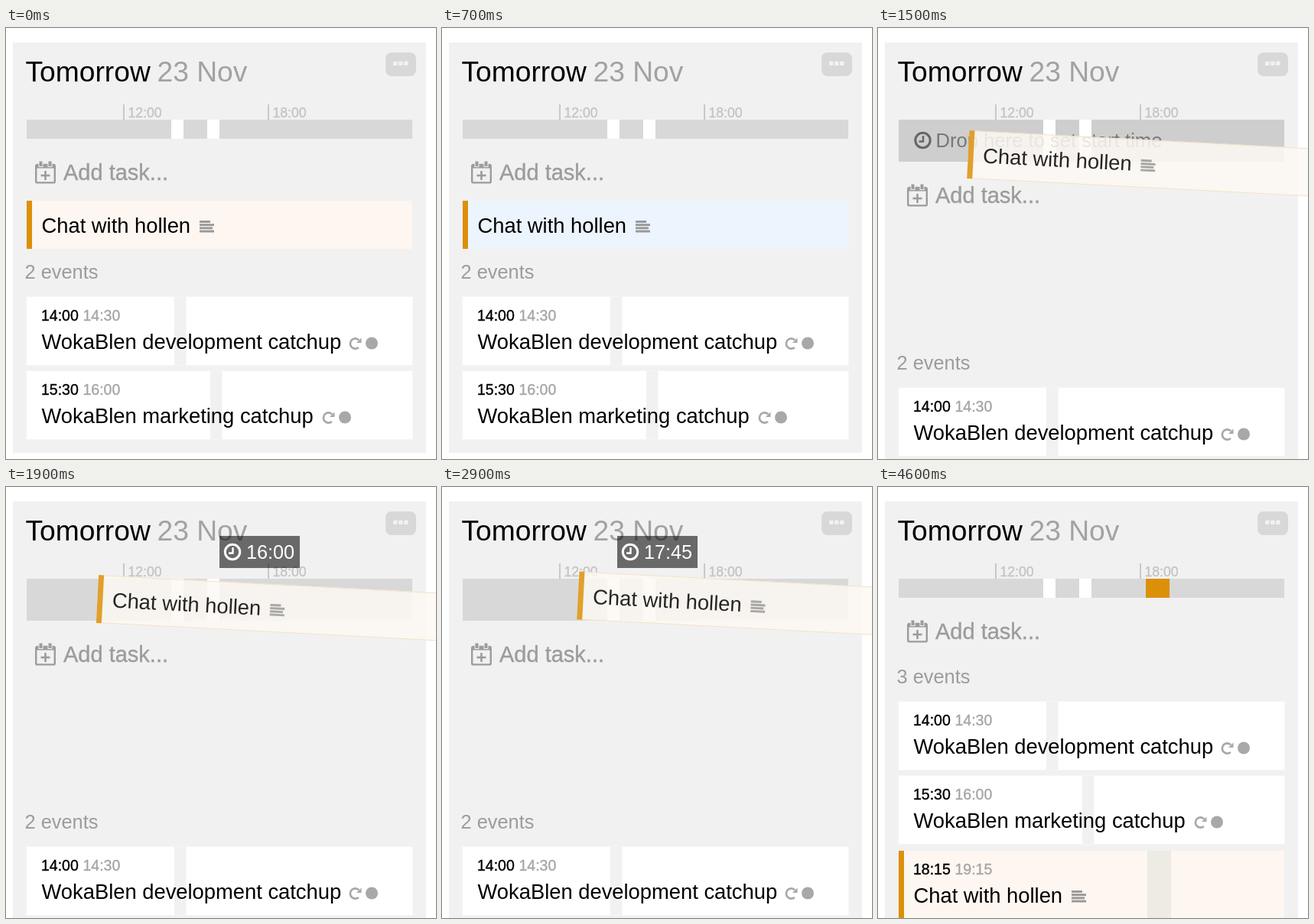
Recreate the animation shown at these times as an HTML page with a canvas. Size 562 by 564 pixels, loop 5800 ms.

```html
<!DOCTYPE html>
<html lang="en">
<head>
<meta charset="utf-8">
<title>Day planner</title>
<style>
html, body { margin: 0; width: 100%; height: 100%; overflow: hidden; background: #fff; }
canvas { display: block; }
</style>
</head>
<body>
<canvas id="stage" width="562" height="564"></canvas>
<script>
const ctx = document.getElementById('stage').getContext('2d');
const LOOP = 5800, TICK = 100;
const PICK = 1200, HOVER = 1600, DROP = 3700;
const BAR_X = 27, BAR_W = 504, HOUR = 31.5, START = 8;
const TILT = 3 * Math.PI / 180;
const PANEL = '#f1f1f1', ORANGE = '#dc9008', GRAY = '#9c9c9c';
const BEIGE = [254, 246, 241], BLUE = [236, 244, 253];
const TASK = 'Chat with hollen', TITLE_SIZE = 27.35;

// time, then the top-left corner of the dragged card
const PATH = [
  [1100, 27, 226], [1500, 119.5, 134], [1700, 121, 116],
  [2300, 121.5, 112.5], [2900, 179.5, 110.5], [3500, 194.5, 109.5]
];

const clamp = v => Math.min(1, Math.max(0, v));
const lerp = (a, b, p) => a + (b - a) * p;
const smooth = p => p * p * (3 - 2 * p);
const hourX = h => BAR_X + (h - START) * HOUR;

function rect(x, y, w, h, color) {
  ctx.fillStyle = color;
  ctx.fillRect(x, y, w, h);
}

function text(str, x, y, size, color, extra = 0) {
  ctx.font = size + 'px "Liberation Sans", Arial, sans-serif';
  ctx.fillStyle = ctx.strokeStyle = color;
  ctx.fillText(str, x, y);
  if (!extra) return;
  ctx.lineWidth = extra;
  ctx.strokeText(str, x, y);
}

function line(points, color, width) {
  ctx.strokeStyle = color;
  ctx.lineWidth = width;
  ctx.beginPath();
  points.forEach(([x, y], i) => i ? ctx.lineTo(x, y) : ctx.moveTo(x, y));
  ctx.stroke();
}

function disc(x, y, r, color) {
  ctx.fillStyle = color;
  ctx.beginPath();
  ctx.arc(x, y, r, 0, Math.PI * 2);
  ctx.fill();
}

function clock(x, y, color) {
  ctx.strokeStyle = color;
  ctx.lineWidth = 3;
  ctx.beginPath();
  ctx.arc(x, y, 9.7, 0, Math.PI * 2);
  ctx.stroke();
  line([[x + 0.5, y - 6], [x + 0.5, y + 1.5], [x - 5, y + 1.5]], color, 2.4);
}

function calendar(x, y) {
  ctx.strokeStyle = GRAY;
  ctx.lineWidth = 2.4;
  ctx.beginPath();
  ctx.roundRect(x + 1.2, y + 4, 24.6, 23.4, 2);
  ctx.stroke();
  rect(x + 1, y + 4, 25, 4.5, GRAY);
  for (const dx of [5.5, 17.5]) {
    rect(x + dx - 1, y, 6, 7, PANEL);
    rect(x + dx, y - 0.5, 4, 6.5, GRAY);
  }
  line([[x + 7.5, y + 18], [x + 19.5, y + 18]], GRAY, 2.6);
  line([[x + 13.5, y + 12], [x + 13.5, y + 24]], GRAY, 2.6);
}

function notes(x, y) {
  [14, 19, 17, 19].forEach((w, i) => rect(x, y + i * 4.2, w, 2.9, '#999'));
}

function repeatIcon(x, y) {
  ctx.strokeStyle = '#a8a8a8';
  ctx.lineWidth = 2.7;
  ctx.beginPath();
  ctx.arc(x, y, 6.6, Math.PI * 0.27, Math.PI * 1.75);
  ctx.stroke();
  ctx.fillStyle = '#a8a8a8';
  ctx.beginPath();
  ctx.moveTo(x + 8, y - 7.5);
  ctx.lineTo(x + 8, y - 1);
  ctx.lineTo(x + 1.5, y - 1);
  ctx.fill();
}

function header() {
  text('Tomorrow', 25.5, 70, 37.2, '#000');
  text('23 Nov', 197.5, 70, 37.2, '#a2a2a2');
  ctx.fillStyle = '#d8d8d8';
  ctx.beginPath();
  ctx.roundRect(496, 32, 40, 31, 8);
  ctx.fill();
  ctx.fillStyle = '#f2f2f2';
  ctx.beginPath();
  for (const x of [506, 513, 520]) ctx.roundRect(x, 43.5, 5.6, 5.6, 1.5);
  ctx.fill();
}

function timeline(height, color, done) {
  for (const h of [12, 18]) {
    rect(hourX(h), 100, 2, 20, '#c8c8c8');
    text(h + ':00', hourX(h) + 6.5, 117, 17.6, '#c4c4c4', 0.4);
  }
  rect(BAR_X, 120, BAR_W, height, color);
  for (const h of [14, 15.5]) rect(Math.round(hourX(h)), 120, 16, height, '#fff');
  if (done) rect(350, 120, 31, height, ORANGE);
}

function taskCard(x, y, h, fill) {
  rect(x, y, BAR_W, h, fill);
  rect(x, y, 7, h, ORANGE);
}

function taskTitle(x, y) {
  text(TASK, x, y, TITLE_SIZE, '#000');
  notes(x + 206.5, y - 15.5);
}

function slotTimes(from, to, y) {
  text(from, 46, y, 19.5, '#000', 0.4);
  text(to, 100.5, y, 19.5, '#a6a6a6', 0.4);
}

function meeting(y, from, to, title, gap, iconX) {
  rect(26, y - 1, BAR_W + 2, 91, '#f5f5f5');
  rect(BAR_X, y, BAR_W, 89, '#fff');
  rect(gap, y, 15.5, 89, PANEL);
  slotTimes(from, to, y + 31);
  text(title, 46.5, y + 68, TITLE_SIZE, '#000');
  repeatIcon(iconX, y + 61);
  disc(iconX + 21.5, y + 60.5, 8, '#a8a8a8');
}

function events(y, done) {
  text((done ? 3 : 2) + ' events', 24.5, y - 24.5, 25.4, GRAY);
  meeting(y, '14:00', '14:30', 'WokaBlen development catchup', 220, 456.5);
  meeting(y + 97, '15:30', '16:00', 'WokaBlen marketing catchup', 267, 421.5);
  if (!done) return;
  const top = y + 195;
  taskCard(BAR_X, top, 89, `rgb(${BEIGE})`);
  rect(352, top, 31, 89, '#edebe4');
  slotTimes('18:15', '19:15', top + 31);
  taskTitle(46.5, top + 67.5);
}

function corner(t) {
  let i = 0;
  while (i < PATH.length - 2 && t > PATH[i + 1][0]) i++;
  const [a, b] = [PATH[i], PATH[i + 1]];
  const p = smooth(clamp((t - a[0]) / (b[0] - a[0])));
  return [lerp(a[1], b[1], p), lerp(a[2], b[2], p)];
}

function dragged(x, y) {
  ctx.save();
  ctx.translate(x, y);
  ctx.rotate(TILT);
  ctx.globalAlpha = 0.85;
  taskCard(0, 0, 63, '#fdf8f2');
  rect(7, 0, BAR_W, 1, '#f0dfbd');
  rect(7, 62, BAR_W, 1, '#f0dfbd');
  taskTitle(19.5, 41.5);
  ctx.restore();
}

function tooltip(cardX) {
  const quarters = Math.round((cardX + 155.5 - BAR_X) / HOUR * 4);
  const hour = START + quarters / 4;
  const label = Math.floor(hour) + ':' + String(quarters % 4 * 15).padStart(2, '0');
  const x = Math.round(hourX(hour)) - (hour > 16 ? 105 : 0);
  rect(x, 64, 105, 42, 'rgba(0,0,0,.56)');
  clock(x + 17, 85, '#fff');
  text(label, x + 35, 94, 25.2, '#fff');
}

function draw(t) {
  const drag = t >= PICK && t < DROP;
  const done = t >= DROP;
  const over = drag && t >= HOVER;
  const shift = drag ? 30 : 0;

  rect(0, 0, 562, 564, '#fff');
  rect(9, 19, 540, drag || done ? 545 : 537, PANEL);
  header();
  timeline(25 + shift, drag && !over ? '#cecece' : '#d8d8d8', done);
  calendar(38, 175 + shift);
  text('Add task...', 75, 199 + shift, 29, GRAY, 0.4);
  events(done ? 281 : drag ? 471 : 352, done);

  if (drag) {
    if (!over) {
      clock(58.5, 147, '#666');
      text('Drop here to set start time', 75.5, 156, 25.6, '#777');
    }
    const [x, y] = corner(t);
    dragged(x, y);
    if (over) tooltip(x);
  } else if (!done) {
    const p = clamp((t - 300) / 400);
    const tint = BEIGE.map((v, i) => Math.round(lerp(v, BLUE[i], p)));
    taskCard(BAR_X, 226, 63, `rgb(${tint})`);
    taskTitle(46.5, 267.5);
  }
}

const begin = performance.now();
function loop() {
  const t = (performance.now() - begin) % LOOP;
  draw(Math.floor(t / TICK) * TICK);
  requestAnimationFrame(loop);
}
loop();
</script>
</body>
</html>
```
